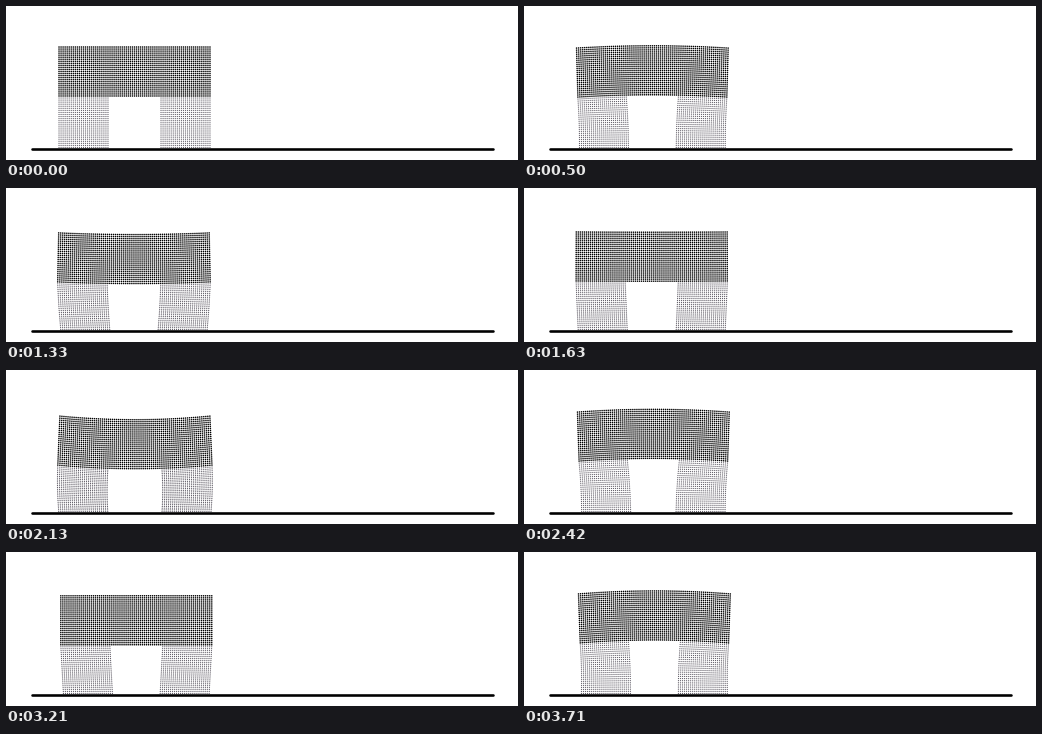
These frames come from a looping animation (512 by 154 pixels, 3750 ms). A matplotlib script:

```python
import numpy as np
import matplotlib.pyplot as plt
from matplotlib.animation import FuncAnimation

W, H, DPI = 512, 154, 100
FRAMES, STEP = 150, 25
LEFT, TOP, FLOOR = 52, 40, 142.5
BLOCK, N = 51.0, 25
MID_X = LEFT + 1.5 * BLOCK
HALF = 1.5 * BLOCK
PITCH = BLOCK / N

# Keyed slow quantities: oscillation cycles, foot spread and sideways drift
KEYS = [0, 1000, 1630, 2130, 2670, 3210, 3710, 3750]
CYCLES = [0, 1.85, 2.76, 3.5, 4.37, 5.25, 6.0, 6.06]
SPREAD = [1.5, -4.1, -2, -0.9, -4, -2.5, -1, -1]
DRIFT = [0, -0.3, -0.8, 0.4, 1.3, 1.8, 1.9, 1.9]


def grid(cols, rows, x0, y0):
    x = x0 + PITCH * (np.arange(cols) + 0.5)
    y = y0 + PITCH * (np.arange(rows) + 0.5)
    return np.stack(np.meshgrid(x, y), -1).reshape(-1, 2)


beam = grid(3 * N, N, LEFT, TOP)
legs = np.vstack([grid(N, N, LEFT + k * BLOCK, TOP + BLOCK) for k in (0, 2)])


def bend_beam(x, y, sink, bend):
    """Lower the beam, bend it into a parabola and let its sides tilt."""
    u = (x - MID_X) / HALF
    v = (y - TOP - BLOCK / 2) / HALF
    return x + bend * u * (0.15 + 0.9 * v), y + sink + bend * (1 - u ** 2)


def pose(t):
    wave = np.cos(2 * np.pi * np.interp(t, KEYS, CYCLES))
    drift = np.interp(t, KEYS, DRIFT)
    spread = np.interp(t, KEYS, SPREAD) - 1.5 * wave
    sink = 3 - 2 * wave - np.exp(-t / 200)
    bend = (0.3 - 3.4 * wave) * (1 - np.exp(-t / 250))

    bx, by = bend_beam(beam[:, 0], beam[:, 1], sink, bend)

    # Each leg column runs from the underside of the beam to the floor
    x, y = legs.T
    q = (y - TOP - BLOCK) / BLOCK
    side = np.sign(x - MID_X)
    top_x, top_y = bend_beam(x, TOP + BLOCK, sink, bend)
    foot_x = x + side * spread
    lx = top_x + (foot_x - top_x) * q + side * 0.2 * bend * np.sin(np.pi * q)
    ly = top_y + (FLOOR - top_y) * q
    return np.column_stack([np.r_[bx, lx] + drift, np.r_[by, ly]])


def area(diameter):
    return (diameter * 72 / DPI) ** 2


fig = plt.figure(figsize=(W / DPI, H / DPI), dpi=DPI, facecolor="white")
ax = fig.add_axes([0, 0, 1, 1])
ax.set_xlim(0, W)
ax.set_ylim(H, 0)
ax.axis("off")

counts = [len(beam), len(legs)]
start = pose(0)
dots = ax.scatter(start[:, 0], start[:, 1],
                  s=np.repeat([area(1.55), area(1.2)], counts),
                  c=np.repeat(["#000000", "#5c5862"], counts),
                  linewidths=0, zorder=1)
ax.plot([25.5, 486.5], [142.5, 142.5], color="black", lw=2.6 * 72 / DPI,
        solid_capstyle="round", zorder=2)


def update(i):
    dots.set_offsets(pose(i * STEP))
    return dots,


anim = FuncAnimation(fig, update, frames=FRAMES, interval=STEP,
                     repeat=True, repeat_delay=0, blit=False)
plt.show()
```
